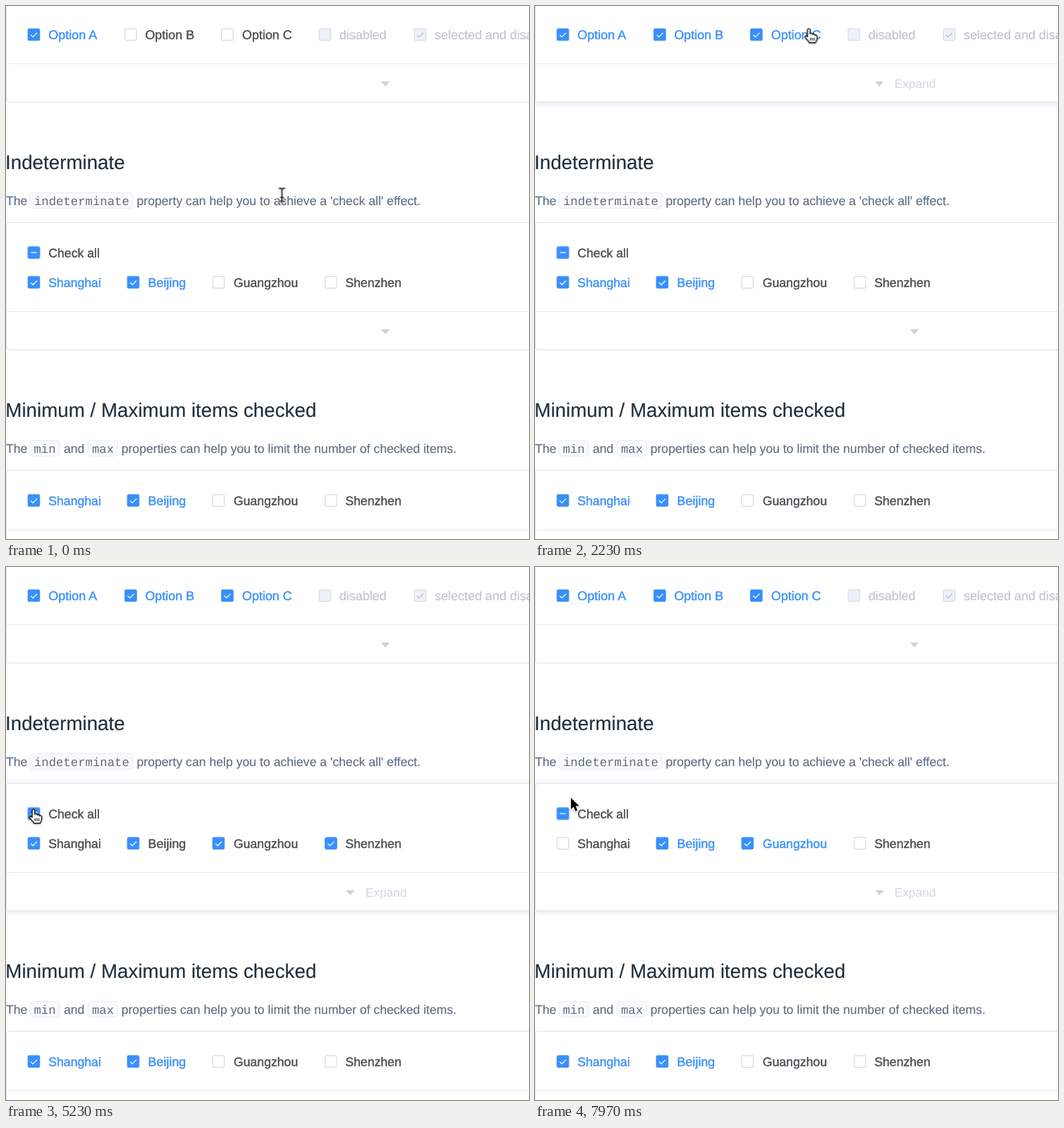
An HTML page that plays this animation: 742x755 px, repeating every 8000 ms.

```html
<!DOCTYPE html>
<html lang="en">
<head>
<meta charset="utf-8">
<title>Checkbox demo</title>
<style>
:root { --blue: #388ffb; --ink: #4b4c52; --line: #d6dae2; --pale: #bfc4cd; }
html, body { margin: 0; width: 100%; height: 100%; overflow: hidden; background: #fff; }
svg { display: block; width: 100%; height: 100%; font: 17.65px "Liberation Sans", Arial, sans-serif; text-rendering: geometricPrecision; }
text { fill: currentColor; }
.title { font-size: 27.75px; color: #1f2f3d; stroke: currentColor; stroke-width: .15; }
.para { color: #5e6d82; stroke: currentColor; stroke-width: .15; }
.code { font: 17.3px "Liberation Mono", "Courier New", monospace; color: #5e6d82; }
.chip { fill: #f9fafc; stroke: #e6ebf6; }
.edge { fill: #fff; stroke: #e4e7ee; stroke-width: 1.3; }
.rule { stroke: #e8ecf8; stroke-width: 1.2; }
.shade { fill: #fff; filter: drop-shadow(0 0 5px rgba(210,216,230,.4)) drop-shadow(0 2px 3px rgba(210,216,230,.4)); opacity: 0; }
.caret { fill: #c9d2df; }
.expand { font-size: 17.3px; color: #d0d7e2; opacity: 0; transform: translateX(50px); }

.label { color: var(--ink); stroke: currentColor; stroke-width: .4; }
.opt { font-size: 17.95px; }
.box { fill: #fff; stroke: var(--line); stroke-width: 1.2; }
.box.on { fill: var(--blue); stroke: var(--blue); }
.box.off { fill: #edf1f9; stroke: #d5dce9; }
.label.on { color: var(--blue); }
.label.off { color: var(--pale); stroke-width: .2; }
.tick { fill: none; stroke: #fff; stroke-width: 1.25; transform: rotate(45deg); }
.off .tick { stroke: #b6bdca; }
.bar { stroke: #fff; stroke-width: 1.3; }

.a, .s { animation-duration: 8s; animation-iteration-count: infinite; }
.s { animation-timing-function: step-end; }

/* demo blocks: hover shadow, caret slide, text reveal */
@keyframes shade1 { 0%, 6.5% { opacity: 0 } 9%, 45.5% { opacity: 1 } 48%, 100% { opacity: 0 } }
@keyframes caret1 { 0%, 6.5% { transform: none } 10.25%, 45.5% { transform: translateX(-49.5px) } 49.25%, 100% { transform: none } }
@keyframes expand1 {
  0%, 6.5% { opacity: 0; transform: translateX(50px) }
  10.25%, 45.5% { opacity: 1; transform: none }
  49.25%, 100% { opacity: 0; transform: translateX(50px) }
}
@keyframes shade2 { 0%, 49.1% { opacity: 0 } 51.6%, 100% { opacity: 1 } }
@keyframes caret2 { 0%, 49% { transform: none } 52.75%, 100% { transform: translateX(-49.5px) } }
@keyframes expand2 { 0%, 49.1% { opacity: 0; transform: translateX(50px) } 52.85%, 100% { opacity: 1; transform: none } }

/* box colours */
@keyframes boxB {
  0%, 10.5% { fill: #fff; stroke: var(--line) }
  12.5% { fill: #fff; stroke: var(--blue) }
  15.6%, 100% { fill: var(--blue); stroke: var(--blue) }
}
@keyframes boxC {
  0%, 19.75% { fill: #fff; stroke: var(--line) }
  22.9%, 25% { fill: #fff; stroke: var(--blue) }
  28%, 100% { fill: var(--blue); stroke: var(--blue) }
}
@keyframes boxAll {
  0%, 65.4% { fill: var(--blue); stroke: var(--blue) }
  67.9%, 70% { fill: #fff; stroke: var(--blue) }
  72.1%, 74.1% { fill: #fff; stroke: var(--line) }
  76.8%, 100% { fill: var(--blue); stroke: var(--blue) }
}
@keyframes boxSh {
  0%, 65.4% { fill: var(--blue); stroke: var(--blue) }
  67.9%, 100% { fill: #fff; stroke: var(--line) }
}
@keyframes boxBj {
  0%, 65.4% { fill: var(--blue); stroke: var(--blue) }
  67.9%, 71.6% { fill: #fff; stroke: var(--line) }
  74.1% { fill: #fff; stroke: var(--blue) }
  76.8%, 100% { fill: var(--blue); stroke: var(--blue) }
}
@keyframes boxGz {
  0%, 55.3% { fill: #fff; stroke: var(--line) }
  58.4%, 65.4% { fill: var(--blue); stroke: var(--blue) }
  67.9%, 86.2% { fill: #fff; stroke: var(--line) }
  89% { fill: #fff; stroke: var(--blue) }
  91.8%, 100% { fill: var(--blue); stroke: var(--blue) }
}
@keyframes boxSz {
  0%, 55.3% { fill: #fff; stroke: var(--line) }
  58.4%, 65.4% { fill: var(--blue); stroke: var(--blue) }
  67.9%, 100% { fill: #fff; stroke: var(--line) }
}

/* ticks grow along their own axis */
@keyframes tickB { 0%, 12.5% { transform: rotate(45deg) scaleY(0) } 14.4%, 100% { transform: rotate(45deg) scaleY(1) } }
@keyframes tickC { 0%, 25% { transform: rotate(45deg) scaleY(0) } 26.9%, 100% { transform: rotate(45deg) scaleY(1) } }
@keyframes tickSh { 0%, 65.4% { transform: rotate(45deg) scaleY(1) } 67.3%, 100% { transform: rotate(45deg) scaleY(0) } }
@keyframes tickBj {
  0%, 65.4% { transform: rotate(45deg) scaleY(1) }
  67.3%, 74.1% { transform: rotate(45deg) scaleY(0) }
  76%, 100% { transform: rotate(45deg) scaleY(1) }
}
@keyframes tickSz {
  0%, 55.3% { transform: rotate(45deg) scaleY(0) }
  57.2%, 65.4% { transform: rotate(45deg) scaleY(1) }
  67.3%, 100% { transform: rotate(45deg) scaleY(0) }
}
@keyframes tickGz {
  0%, 55.3% { transform: rotate(45deg) scaleY(0) }
  57.2%, 65.4% { transform: rotate(45deg) scaleY(1) }
  67.3%, 89% { transform: rotate(45deg) scaleY(0) }
  90.9%, 100% { transform: rotate(45deg) scaleY(1) }
}
@keyframes bar { 0% { opacity: 1 } 55.3% { opacity: 0 } 74.1%, 100% { opacity: 1 } }

/* labels switch at once */
@keyframes textB { 0% { color: var(--ink) } 12.5%, 100% { color: var(--blue) } }
@keyframes textC { 0% { color: var(--ink) } 25%, 100% { color: var(--blue) } }
@keyframes textAll { 0% { color: var(--ink) } 55.3% { color: var(--blue) } 65.3%, 100% { color: var(--ink) } }
@keyframes textSh { 0% { color: var(--blue) } 65.3%, 100% { color: var(--ink) } }
@keyframes textBj { 0% { color: var(--blue) } 65.3% { color: var(--ink) } 74.1%, 100% { color: var(--blue) } }
@keyframes textGz { 0% { color: var(--ink) } 55.3% { color: var(--blue) } 65.3% { color: var(--ink) } 89%, 100% { color: var(--blue) } }

/* pointer path and shape */
@keyframes move {
  0%, 1.6% { transform: translate(391.5px, 267.5px); animation-timing-function: ease-in }
  6.25% { transform: translate(315px, 150px); animation-timing-function: ease-out }
  11.6%, 14% { transform: translate(184px, 40px); animation-timing-function: ease-in-out }
  17.875% { transform: translate(296.5px, 35px); animation-timing-function: ease-out }
  22%, 25.4% { transform: translate(315px, 37px); animation-timing-function: ease-in }
  27.875% { transform: translate(388px, 33px); animation-timing-function: ease-out }
  30.5% { transform: translate(456px, 26px); animation-timing-function: ease-in-out }
  33.75%, 42.8% { transform: translate(430px, 37px); animation-timing-function: ease-in-out }
  49.5% { transform: translate(35.5px, 344px) }
  52.8%, 69.5% { transform: translate(39px, 344px); animation-timing-function: ease-in-out }
  72.1%, 76% { transform: translate(199px, 403px); animation-timing-function: ease-in-out }
  84.1%, 84.5% { transform: translate(264px, 392px); animation-timing-function: ease-in }
  85.875% { transform: translate(290.5px, 387.5px); animation-timing-function: ease-out }
  87.5%, 91% { transform: translate(303px, 392px); animation-timing-function: ease-in-out }
  94.6%, 95% { transform: translate(188px, 388px); animation-timing-function: ease-in-out }
  99.6%, 100% { transform: translate(51px, 327px) }
}
@keyframes beam { 0% { opacity: 1 } 2.8%, 100% { opacity: 0 } }
@keyframes arrow {
  0% { opacity: 0 } 2.8% { opacity: 1 } 10% { opacity: 0 } 16.8% { opacity: 1 } 19.3% { opacity: 0 }
  28.8% { opacity: 1 } 48.8% { opacity: 0 } 70.5% { opacity: 1 } 71.5% { opacity: 0 }
  81.8% { opacity: 1 } 86.1% { opacity: 0 } 92% { opacity: 1 } 93% { opacity: 0 } 96%, 100% { opacity: 1 }
}
@keyframes hand {
  0% { opacity: 0 } 10% { opacity: 1 } 16.8% { opacity: 0 } 19.3% { opacity: 1 }
  28.8% { opacity: 0 } 48.8% { opacity: 1 } 70.5% { opacity: 0 } 71.5% { opacity: 1 }
  81.8% { opacity: 0 } 86.1% { opacity: 1 } 92% { opacity: 0 } 93% { opacity: 1 } 96%, 100% { opacity: 0 }
}
.cursor { filter: drop-shadow(0 1px 1px rgba(0,0,0,.28)); }
</style>
</head>
<body>
<svg viewBox="0 0 742 755" xmlns="http://www.w3.org/2000/svg">
  <defs>
    <rect id="sq" x="-8.2" y="-8.2" width="16.4" height="16.4" rx="2"/>
    <path id="tk" d="M-2.9 3.4H1.5V-5"/>
    <path id="ct" d="M532 107h12.4l-6.2 7z"/>
    <path id="ib" d="M-4 -9.5Q0 -9.5 0 -7Q0 -9.5 4 -9.5M0 -7V7M-4 9.5Q0 9.5 0 7Q0 9.5 4 9.5M-2 3.5H2"/>
  </defs>

  <!-- options -->
  <rect class="shade a" style="animation-name:shade1" x=".6" y="-60" width="900" height="196" rx="4"/>
  <rect class="edge" x=".6" y="-60" width="900" height="196" rx="4"/>
  <path class="rule" d="M1 81.7H742"/>
  <use href="#ct" class="caret a" style="animation-name:caret1"/>
  <text class="expand a" style="animation-name:expand1" x="510" y="116">Expand</text>

  <g class="box on" transform="translate(39.5 40.5)"><use href="#sq"/><use href="#tk" class="tick"/></g>
  <text class="label opt on" x="60.3" y="46.8">Option A</text>
  <g class="box a" style="animation-name:boxB" transform="translate(177 40.5)"><use href="#sq"/><use href="#tk" class="tick a" style="animation-name:tickB"/></g>
  <text class="label opt s" style="animation-name:textB" x="197.4" y="46.8">Option B</text>
  <g class="box a" style="animation-name:boxC" transform="translate(314 40.5)"><use href="#sq"/><use href="#tk" class="tick a" style="animation-name:tickC"/></g>
  <text class="label opt s" style="animation-name:textC" x="335" y="46.8">Option C</text>
  <g class="box off" transform="translate(452.5 40.5)"><use href="#sq"/></g>
  <text class="label opt off" x="473" y="46.8">disabled</text>
  <g class="box off" transform="translate(587.5 40.5)"><use href="#sq"/><use href="#tk" class="tick"/></g>
  <text class="label opt off" x="608.3" y="46.8">selected and disabled</text>

  <!-- indeterminate -->
  <text class="title" x="-1" y="231">Indeterminate</text>
  <text class="para" x="0" y="281.7">The</text>
  <rect class="chip" x="34" y="264.5" width="146" height="22" rx="4"/>
  <text class="code" x="40" y="281.5">indeterminate</text>
  <text class="para" x="185.5" y="281.7">property can help you to achieve a 'check all' effect.</text>

  <rect class="shade a" style="animation-name:shade2" x=".6" y="306.7" width="900" height="180.3" rx="4"/>
  <rect class="edge" x=".6" y="306.7" width="900" height="180.3" rx="4"/>
  <path class="rule" d="M1 432.7H742"/>
  <g transform="translate(0 351)">
    <use href="#ct" class="caret a" style="animation-name:caret2"/>
    <text class="expand a" style="animation-name:expand2" x="510" y="116">Expand</text>
  </g>

  <g class="box a" style="animation-name:boxAll" transform="translate(39.5 349.3)">
    <use href="#sq"/>
    <path class="bar s" style="animation-name:bar" d="M-4.2 0H4.2"/>
    <use href="#tk" class="tick a" style="animation-name:tickSz"/>
  </g>
  <text class="label s" style="animation-name:textAll" x="60.3" y="355.8">Check all</text>
  <g class="box a" style="animation-name:boxSh" transform="translate(39.5 391.4)"><use href="#sq"/><use href="#tk" class="tick a" style="animation-name:tickSh"/></g>
  <text class="label s" style="animation-name:textSh" x="60.3" y="397.8">Shanghai</text>
  <g class="box a" style="animation-name:boxBj" transform="translate(180.5 391.4)"><use href="#sq"/><use href="#tk" class="tick a" style="animation-name:tickBj"/></g>
  <text class="label opt s" style="animation-name:textBj" x="201.5" y="397.8">Beijing</text>
  <g class="box a" style="animation-name:boxGz" transform="translate(301.5 391.4)"><use href="#sq"/><use href="#tk" class="tick a" style="animation-name:tickGz"/></g>
  <text class="label s" style="animation-name:textGz" x="323" y="397.8">Guangzhou</text>
  <g class="box a" style="animation-name:boxSz" transform="translate(461 391.4)"><use href="#sq"/><use href="#tk" class="tick a" style="animation-name:tickSz"/></g>
  <text class="label s" style="animation-name:textAll" x="481.5" y="397.8">Shenzhen</text>

  <!-- limits -->
  <text class="title" x="-.7" y="582">Minimum / Maximum items checked</text>
  <text class="para" x="0" y="632.7">The</text>
  <rect class="chip" x="34" y="615.5" width="42" height="22" rx="4"/>
  <text class="code" x="39.5" y="632.5">min</text>
  <text class="para" x="82" y="632.7">and</text>
  <rect class="chip" x="116.5" y="615.5" width="42" height="22" rx="4"/>
  <text class="code" x="122" y="632.5">max</text>
  <text class="para" x="163.7" y="632.7">properties can help you to limit the number of checked items.</text>

  <rect class="edge" x=".6" y="657.7" width="900" height="180" rx="4"/>
  <path class="rule" d="M1 741.7H742"/>
  <g class="box on" transform="translate(39.5 700.4)"><use href="#sq"/><use href="#tk" class="tick"/></g>
  <text class="label on" x="60.3" y="706.8">Shanghai</text>
  <g class="box on" transform="translate(180.5 700.4)"><use href="#sq"/><use href="#tk" class="tick"/></g>
  <text class="label opt on" x="201.5" y="706.8">Beijing</text>
  <g class="box" transform="translate(301.5 700.4)"><use href="#sq"/></g>
  <text class="label" x="323" y="706.8">Guangzhou</text>
  <g class="box" transform="translate(461 700.4)"><use href="#sq"/></g>
  <text class="label" x="481.5" y="706.8">Shenzhen</text>

  <!-- pointer, origin at its hot spot -->
  <g class="cursor a" style="animation-name:move">
    <g class="s" style="animation-name:beam" fill="none" stroke-linecap="round">
      <use href="#ib" stroke="#fff" stroke-width="3"/>
      <use href="#ib" stroke="#111" stroke-width="1.5"/>
    </g>
    <path class="s" style="animation-name:arrow;paint-order:stroke" fill="#000" stroke="#fff" stroke-width="2"
      d="M0 0V16.2L3.7 12.7L6.4 19L9.2 17.8L6.6 11.6H11.6Z"/>
    <g class="s" style="animation-name:hand">
      <g transform="translate(-7.2 -2) scale(1.14 1)" stroke="#111">
        <path fill="#fff" stroke-width="1.3" stroke-linejoin="round"
          d="M4.6 12.6V2.9c0-2.3 3.3-2.3 3.3 0V8.6c.3-1.6 2.9-1.5 3 .2V9.6c.4-1.4 2.8-1.2 2.9.5V10.8c.5-1.2 2.7-.9 2.7.9V15.2c0 2.6-1.6 3.6-1.8 5.8H6.8c-.4-2.3-3.5-4.9-5.1-7.4-1-1.7.9-3 2.1-1.8z"/>
        <path fill="none" d="M8.3 14V18M10.6 14V18M12.9 14V18"/>
      </g>
    </g>
  </g>
</svg>
</body>
</html>
```
